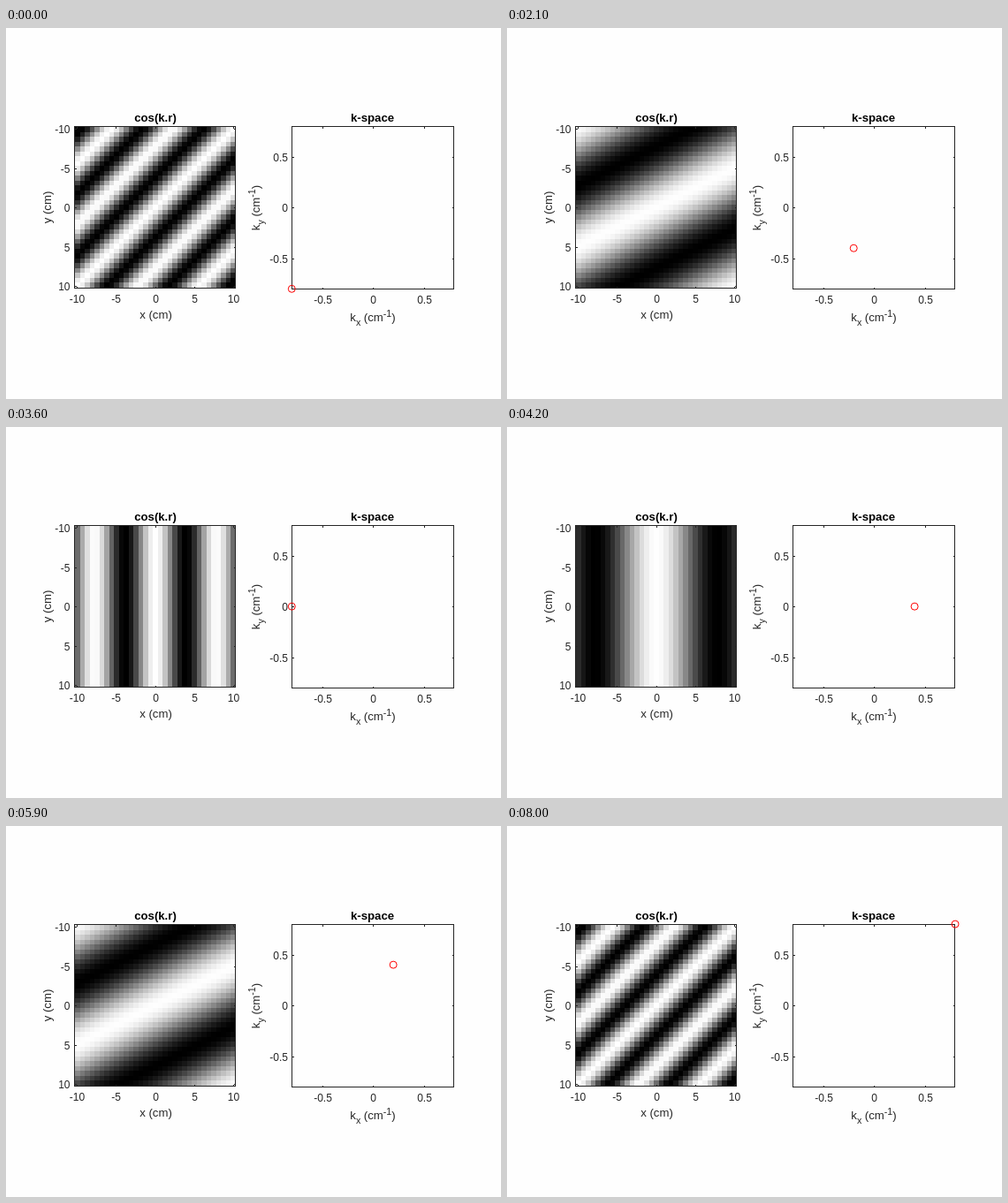
An HTML page with a canvas for the animation above (8.1 s loop, 560 px wide and 420 px high).

```html
<!DOCTYPE html>
<html lang="en">
<head>
<meta charset="utf-8">
<title>Plane waves and k-space</title>
<style>
  html, body { margin: 0; width: 100%; height: 100%; overflow: hidden; background: #fefefe; }
  canvas, svg { position: absolute; left: 0; top: 0; width: 560px; height: 420px; }
  text { font: 12px "Liberation Sans", Arial, sans-serif; fill: #262626; text-anchor: middle; }
  .end { text-anchor: end; }
  .label { font-size: 13.2px; }
  .title { font-size: 13.2px; font-weight: bold; fill: #000; }
  .small { font-size: 10.6px; }
  path { fill: none; stroke: #262626; stroke-width: 1; shape-rendering: crispEdges; }
  circle { fill: none; stroke: #f00; stroke-width: 1; }
</style>
</head>
<body>
<canvas id="wave" width="560" height="420"></canvas>
<svg id="plot" viewBox="0 0 560 420">
  <g id="axes"></g>
  <text class="title" x="169" y="106">cos(k.r)</text>
  <text class="title" x="414.5" y="106">k-space</text>
  <text class="label" x="169.5" y="329">x (cm)</text>
  <text class="label" transform="translate(50.5 203) rotate(-90)">y (cm)</text>
  <text class="label" x="415" y="332">k<tspan class="small" dy="4.5">x</tspan><tspan dy="-4.5"> (cm</tspan><tspan class="small" dy="-5">-1</tspan><tspan dy="5">)</tspan></text>
  <text class="label" transform="translate(287 203.5) rotate(-90)">k<tspan class="small" dy="4.5">y</tspan><tspan dy="-4.5"> (cm</tspan><tspan class="small" dy="-5">-1</tspan><tspan dy="5">)</tspan></text>
  <circle id="dot" r="4"/>
</svg>
<script>
const CELLS = 33, STEPS = 9, FRAME = 100;
const LEFT = 78, TOP = 112, SIZE = 182;
const ctx = document.getElementById('wave').getContext('2d');
const dot = document.getElementById('dot');
const axes = document.getElementById('axes');

function add(tag, attrs, text = '') {
  const el = document.createElementNS('http://www.w3.org/2000/svg', tag);
  for (const name in attrs) el.setAttribute(name, attrs[name]);
  el.textContent = text;
  axes.append(el);
}

// ticks: [label, x position, y position]
function drawAxes(l, t, r, b, ticks, labelX, labelY) {
  let d = `M${l} ${t}H${r}V${b}H${l}Z`;
  for (const [text, x, y] of ticks) {
    d += `M${x} ${t}v2M${x} ${b}v-2M${l} ${y}h2M${r} ${y}h-2`;
    add('text', { x, y: labelY }, text);
    add('text', { x: labelX, y: y + 4.5, class: 'end' }, text);
  }
  add('path', { d });
}

drawAxes(77.5, 111.5, 259.5, 294.5,
  [-10, -5, 0, 5, 10].map((v, i) => [v, Math.round(80 + 44.3 * i) + 0.5, Math.round(114.3 + 44.4 * i) + 0.5]),
  72.5, 311);
drawAxes(323.5, 111.5, 506.5, 295.5,
  [-0.5, 0, 0.5].map(v => [v, Math.round(415 + 115 * v) + 0.5, Math.round(203 - 115 * v) + 0.5]),
  319, 312);

const edge = i => Math.round(i * SIZE / CELLS);
const coord = i => -10 + 20 * i / (CELLS - 1);

function drawWave(kx, ky) {
  const vals = [];
  for (let j = 0; j < CELLS; j++)
    for (let i = 0; i < CELLS; i++)
      vals.push(Math.cos(kx * coord(i) + ky * coord(j)));
  let lo = Math.min(...vals), hi = Math.max(...vals);
  if (hi - lo < 1e-9) { lo -= 1; hi += 1; }
  vals.forEach((v, n) => {
    const i = n % CELLS, j = Math.floor(n / CELLS);
    const g = Math.round(254 * (v - lo) / (hi - lo));
    ctx.fillStyle = `rgb(${g},${g},${g})`;
    ctx.fillRect(LEFT + edge(i), TOP + edge(j), edge(i + 1) - edge(i), edge(j + 1) - edge(j));
  });
}

let shown = -1;
function show(step) {
  if (step === shown) return;
  shown = step;
  const col = step % STEPS, row = Math.floor(step / STEPS);
  drawWave((col - 4) / 5, (row - 4) / 5);
  dot.setAttribute('cx', 323.3 + 22.97 * col);
  dot.setAttribute('cy', 295.3 - 23.03 * row);
}

const start = performance.now();
function tick(now) {
  show(Math.floor(Math.max(0, now - start) / FRAME) % (STEPS * STEPS));
  requestAnimationFrame(tick);
}
show(0);
requestAnimationFrame(tick);
</script>
</body>
</html>
```
